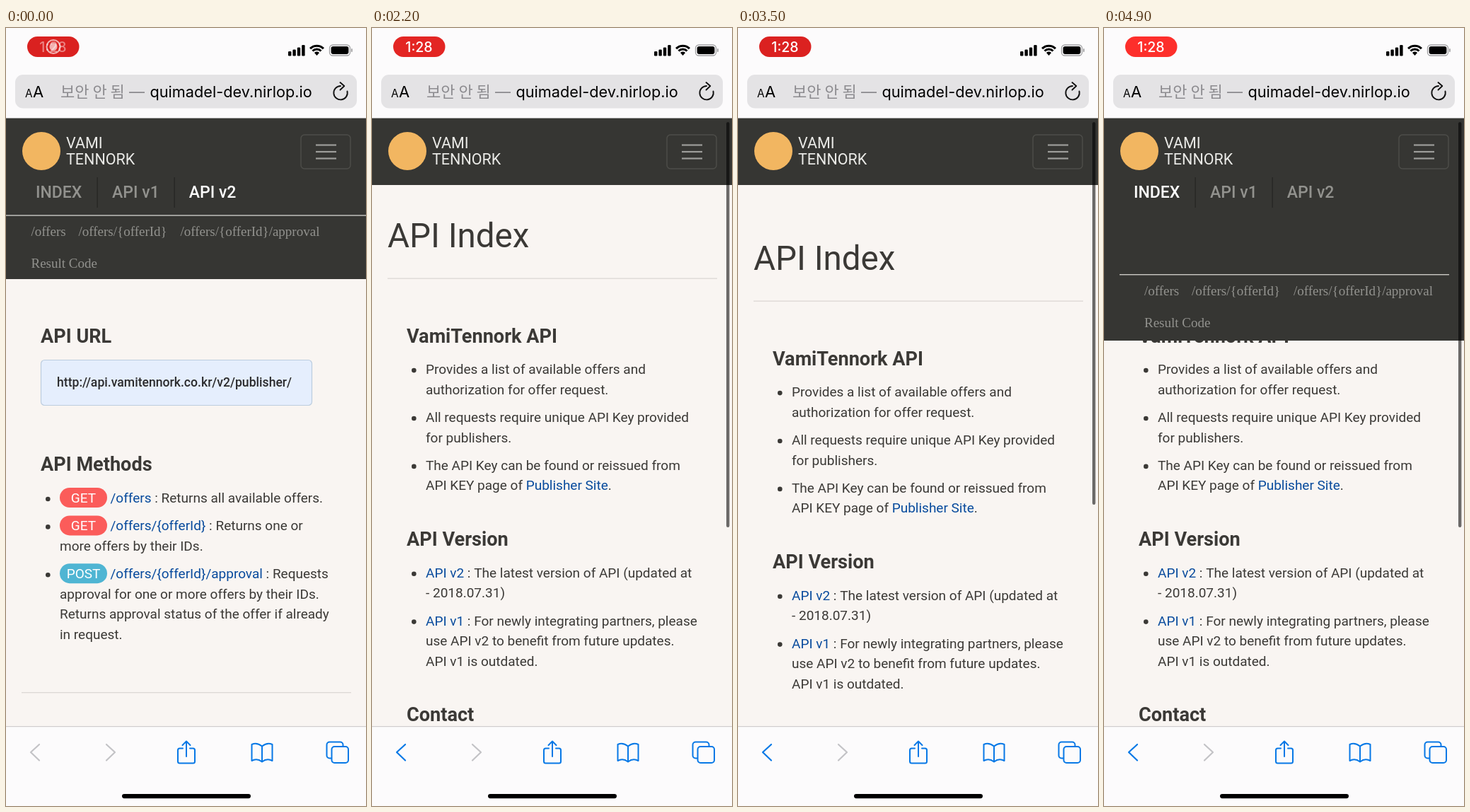
Recreate the animation shown at these times as an HTML page with a canvas. Size 509x1100 px, loop 5000 ms.

```html
<!DOCTYPE html>
<html lang="en">
<head>
<meta charset="utf-8">
<title>API guide on a phone</title>
<style>
html, body { margin: 0; width: 100%; height: 100%; overflow: hidden; background: #f9f5f2; }
canvas { display: block; width: 509px; height: 1100px; }
</style>
</head>
<body>
<canvas id="stage"></canvas>
<script>
const W = 509, H = 1100, LOOP = 5000, STEP = 100;
const canvas = document.getElementById('stage');
const ctx = canvas.getContext('2d');
const dpr = window.devicePixelRatio || 1;
canvas.width = W * dpr;
canvas.height = H * dpr;

const INK = '#3b3936', LINK = '#084b9d', PAGE = '#f9f5f2', DARK = '#363633';
const BLUE = '#0778e6', GREY = '#c3c3c6', DIM = '#92928e', CHROME = '#fcfbfc';
const ROBOTO = 'Roboto, sans-serif', INTER = 'Inter, sans-serif';
const SERIF = '"Liberation Serif", serif';
const KOREAN = '"Noto Sans CJK KR", "Noto Sans CJK", sans-serif';

// [time, value] pairs
const SCROLL = [[2250, 0], [2400, 70], [2500, 260], [2600, 500], [2700, 597], [2850, 550],
  [3050, 524], [3100, 515], [3200, 390], [3300, 120], [3400, -46], [3500, -32],
  [3700, -11], [4000, -2], [4200, 0]];
const COLLAPSE = [[2300, 0], [2400, .35], [2500, 1], [2600, .6], [2700, .11], [2800, 0]];
const SCROLL_MAX = 524, INDEX_TAP = 1000, LOADED = 1500, BAR_SHOWN = 2100;

const clamp = v => Math.max(0, Math.min(1, v));
const ease = v => (1 - Math.cos(Math.PI * clamp(v))) / 2;

function track(keys, t) {
  if (t <= keys[0][0]) return keys[0][1];
  for (let i = 1; i < keys.length; i++) {
    const [t0, a] = keys[i - 1], [t1, b] = keys[i];
    if (t < t1) return a + (b - a) * (t - t0) / (t1 - t0);
  }
  return keys[keys.length - 1][1];
}

function text(str, x, y, size, color = INK, family = ROBOTO, weight = 400, align = 'left') {
  ctx.font = `${weight} ${size}px ${family}`;
  ctx.fillStyle = color;
  ctx.textAlign = align;
  ctx.fillText(str, x, y);
  return ctx.measureText(str).width;
}

function rect(x, y, w, h, color) {
  ctx.fillStyle = color;
  ctx.fillRect(x, y, w, h);
}

function round(x, y, w, h, r, fill, stroke, lw = 1) {
  ctx.beginPath();
  ctx.roundRect(x, y, w, h, r);
  if (fill) { ctx.fillStyle = fill; ctx.fill(); }
  if (stroke) { ctx.strokeStyle = stroke; ctx.lineWidth = lw; ctx.stroke(); }
}

function disc(x, y, r, color) {
  ctx.beginPath();
  ctx.arc(x, y, r, 0, 7);
  ctx.fillStyle = color;
  ctx.fill();
}

function stroke(d, color, lw) {
  ctx.strokeStyle = color;
  ctx.lineWidth = lw;
  ctx.lineCap = ctx.lineJoin = 'round';
  ctx.stroke(new Path2D(d));
}

// Text between backticks is drawn as a link.
function rich(str, x, y) {
  str.split('`').forEach((part, i) => {
    if (part) x += text(part, x, y, 19, i % 2 ? LINK : INK);
  });
}

const heading = (str, y) => text(str, 49, y, 27.1, INK, ROBOTO, 700);
const rule = y => rect(22, y, 466, 1.3, '#dcd8d5');

function item(y, lines, badge, color) {
  disc(59.3, y - 5, 3.3, INK);
  if (badge) {
    round(76, y - 21, 67, 28, 14, color);
    text(badge, 109.5, y, 19, '#fff', ROBOTO, 400, 'center');
  }
  lines.forEach((line, i) => rich(line, badge && !i ? 147.5 : 76, y + i * 28.5));
}

function methodsPage() {
  heading('API URL', 445);
  round(49.5, 469.5, 383, 64, 5, '#e5eefd', '#bccddf', 1.2);
  text('http://api.vamitennork.co.kr/v2/publisher/', 72, 507, 17.6, '#2b2b2d', ROBOTO, 500);
  heading('API Methods', 626);
  item(671, ['`/offers` : Returns all available offers.'], 'GET', '#fb5c5a');
  item(710.4, ['`/offers/{offerId}` : Returns one or', 'more offers by their IDs.'], 'GET', '#fb5c5a');
  item(778.2, ['`/offers/{offerId}/approval` : Requests', 'approval for one or more offers by their IDs.',
    'Returns approval status of the offer if already', 'in request.'], 'POST', '#4fb5d3');
  rule(939);
}

function indexPage() {
  text('API Index', 22, 310, 47.5);
  rule(353.5);
  heading('VamiTennork API', 445);
  item(489.1, ['Provides a list of available offers and', 'authorization for offer request.']);
  item(557, ['All requests require unique API Key provided', 'for publishers.']);
  item(624.9, ['The API Key can be found or reissued from', 'API KEY page of `Publisher Site`.']);
  heading('API Version', 732);
  item(776.7, ['`API v2` : The latest version of API (updated at', '- 2018.07.31)']);
  item(844.6, ['`API v1` : For newly integrating partners, please',
    'use API v2 to benefit from future updates.', 'API v1 is outdated.']);
  heading('Contact', 980);
  item(1024.5, ['E-mail : vamitennork@quimadel.com']);
  rect(39, 1407, 21, 21, '#4a4744');
  text('quimadel', 62, 1425, 25, '#4a4744', ROBOTO, 700);
  text('© 2018 Quimadel, Inc. All Right Reserved.', 171, 1426, 16.3);
}

function subLinks(x, y) {
  [['/offers', 0, 0], ['/offers/{offerId}', 67, 0], ['/offers/{offerId}/approval', 211, 0], ['Result Code', 0, 44.5]]
    .forEach(([label, dx, dy]) => text(label, x + dx, y + dy, 19, DIM, SERIF));
}

function tabs(lit) {
  ['INDEX', 'API v1', 'API v2'].forEach((label, i) =>
    text(label, [42, 150, 258.7][i], 239.5, 23, lit[i] ? '#fff' : DIM, ROBOTO, 500));
  rect(128.5, 211, 1.3, 43, '#262624');
  rect(237.5, 211, 1.3, 43, '#262624');
}

function siteHeader(t) {
  const onIndex = t >= LOADED;
  const bottom = onIndex ? 222 + 220 * ease((t - 4500) / 400) : 355;
  rect(0, 120, W, bottom - 120, DARK);
  disc(50, 174, 27, '#f2b661');
  text('VAMI', 85, 170, 21.5, '#ebebe8');
  text('TENNORK', 85, 193, 21.5, '#ebebe8');
  round(417, 151, 70, 48, 5, null, '#4d4d49', 1.4);
  for (const y of [165.5, 175, 184.5]) rect(438, y - 1.1, 29, 2.2, '#9d9d9a');
  ctx.save();
  ctx.beginPath();
  ctx.rect(0, 205, W, Math.max(0, bottom - 205));
  ctx.clip();
  if (!onIndex) {
    tabs([t >= INDEX_TAP, 0, 1]);
    rect(0, 264.3, W, 1.4, '#cbcbc7');
    subLinks(35.5, 294);
  } else if (bottom > 222) {
    tabs([1, 0, 0]);
    rect(22, 348, 466, 1.4, '#cbc9c4');
    subLinks(57, 378);
  }
  ctx.restore();
}

function scrollBar(scroll, c) {
  const top = 133 - 40 * c, end = Math.min(983 + 112 * c, 1092);
  const over = Math.max(0, -scroll, scroll - SCROLL_MAX);
  const len = 573 * (end - top) / 850 - over;
  const y = top + (end - top - len) * clamp(scroll / SCROLL_MAX);
  round(501, y, 4.4, len, 2.2, 'rgba(0,0,0,.57)');
}

function statusBar(t) {
  const glow = clamp(.5 + .8 * Math.cos((t - 800) / 1000 * Math.PI));
  const mix = (a, b) => Math.round(a + (b - a) * glow);
  round(30, 12, 73.5, 29, 14.5, `rgb(${mix(218, 253)},${mix(33, 47)},${mix(32, 43)})`);
  const k = clamp(t / 400);
  ctx.globalAlpha = .45 + .55 * k;
  text('1:28', 66.5, 33.5, 19.5, '#fff', INTER, 500, 'center');
  ctx.globalAlpha = .65 * (1 - k);
  ctx.beginPath();
  ctx.arc(67, 26.5, 9.5, 0, 7);
  ctx.strokeStyle = '#fff';
  ctx.lineWidth = 2;
  ctx.stroke();
  disc(67, 26.5, 5.5, '#fff');
  ctx.globalAlpha = 1;

  [6.5, 9, 12, 15.5].forEach((h, i) => round(399 + i * 6.4, 39.5 - h, 4.4, h, 1.2, '#000'));
  ctx.strokeStyle = '#000';
  ctx.lineCap = 'butt';
  ctx.lineWidth = 3.1;
  for (const r of [8.5, 13.3]) {
    ctx.beginPath();
    ctx.arc(439.5, 38.5, r, -Math.PI * .75, -Math.PI * .25);
    ctx.stroke();
  }
  ctx.beginPath();
  ctx.moveTo(439.5, 39);
  ctx.arc(439.5, 38.5, 5, -Math.PI * .75, -Math.PI * .25);
  ctx.fillStyle = '#000';
  ctx.fill();
  round(457.5, 24, 29, 15, 4.5, null, '#a0a0a2', 1.3);
  round(459.6, 26.1, 24.8, 10.8, 2.8, '#000');
  round(488, 29, 1.8, 5, 1, '#a0a0a2');
}

function addressBar(c) {
  rect(0, 0, W, 127.5 - 40 * c, CHROME);
  ctx.save();
  ctx.translate(254.5, 89.5 - 22 * c);
  const s = 1 - .26 * c;
  ctx.scale(s, s);
  ctx.translate(-254.5, -89.5);
  ctx.globalAlpha = 1 - c;
  round(13, 66, 483, 47.5, 11, '#e4e3e5');
  ctx.globalAlpha = clamp(1 - 2 * c);
  text('A', 27, 98, 15.3, '#000', INTER);
  text('A', 38, 98, 22, '#000', INTER);
  stroke('M473 82 A9.7 9.7 0 1 0 482.5 89.5 M472.5 77 L478.3 82 L472.5 87.5', '#111', 1.9);
  ctx.globalAlpha = 1;
  text('보안 안 됨', 77, 97.5, 22, '#8c8b8f', KOREAN);
  text('—', 174, 97.5, 22, '#8c8b8f', INTER);
  text('quimadel-dev.nirlop.io', 203.5, 97.5, 21.7, '#000', INTER);
  ctx.restore();
}

function toolbar(t, c) {
  ctx.save();
  ctx.translate(0, 112 * c);
  rect(0, 987.5, W, 130, CHROME);
  rect(0, 987, W, 1.2, '#cfcdcd');
  stroke('M47 1013 L35 1024 L47 1035.5', t >= LOADED ? BLUE : GREY, 2.2);
  stroke('M142 1013 L154 1024 L142 1035.5', GREY, 2.2);
  stroke('M250 1018.5 H245.5 Q243 1018.5 243 1021 V1037 Q243 1039.5 245.5 1039.5 H264.5 Q267 1039.5 267 1037' +
    ' V1021 Q267 1018.5 264.5 1018.5 H260 M255 1030 V1009 M249.5 1014 L255 1008.5 L260.5 1014', BLUE, 2);
  stroke('M362 1015.5 Q354.5 1009.5 347.5 1013 V1036 Q355 1032 362 1037.5 Q369 1032 376.5 1036' +
    ' V1013 Q369.5 1009.5 362 1015.5 V1037', BLUE, 2);
  round(453.5, 1009.5, 23, 23, 4, null, BLUE, 2);
  round(460.5, 1016, 23.5, 23, 4, CHROME, BLUE, 2);
  ctx.restore();
  round(164, 1083, 182, 6.2, 3.1, '#000');
}

function draw(t) {
  const scroll = track(SCROLL, t), c = track(COLLAPSE, t);
  const onIndex = t >= LOADED;
  ctx.setTransform(dpr, 0, 0, dpr, 0, 0);
  rect(0, 0, W, H, PAGE);

  ctx.save();
  ctx.translate(0, -scroll);
  (onIndex ? indexPage : methodsPage)();
  ctx.restore();

  ctx.save();
  ctx.translate(0, -40 * c);
  siteHeader(t);
  ctx.restore();

  if (t >= BAR_SHOWN) scrollBar(scroll, c);
  addressBar(c);
  statusBar(t);
  toolbar(t, c);
}

const start = performance.now();
function tick() {
  const t = (performance.now() - start) % LOOP;
  draw(Math.floor(t / STEP) * STEP);
  requestAnimationFrame(tick);
}
tick();
</script>
</body>
</html>
```
